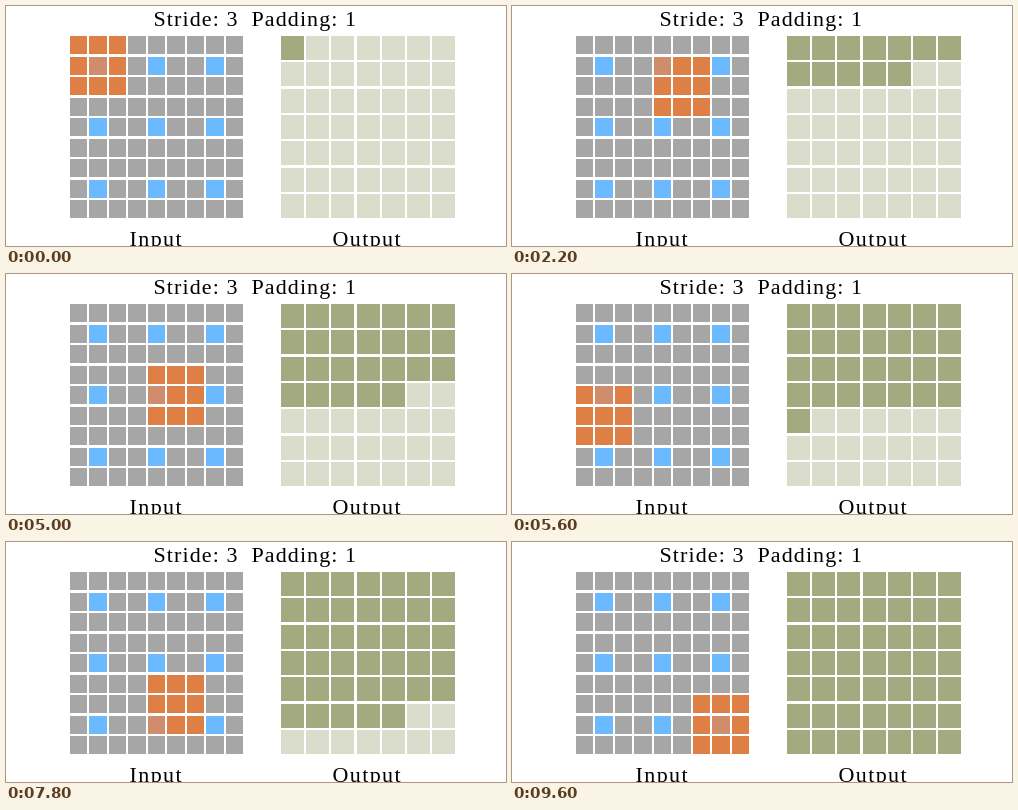
These frames come from a looping animation (500x240 px, 9.8 s). An HTML page:

```html
<!DOCTYPE html>
<html lang="en">
<head>
<meta charset="utf-8">
<title>Convolution arithmetic</title>
<style>
  html, body { margin: 0; width: 500px; height: 240px; overflow: hidden; background: #fff; }
  svg { display: block; shape-rendering: crispEdges; }
  text { font: 22px "Liberation Serif", "Times New Roman", serif; letter-spacing: 1.1px; }
  .caption { letter-spacing: 1.4px; }
</style>
</head>
<body>
<svg width="500" height="240" viewBox="0 0 500 240">
  <g id="input"></g>
  <g id="output"></g>
  <text x="147.5" y="20">Stride: 3</text>
  <text x="245.5" y="20">Padding: 1</text>
  <text class="caption" x="123.5" y="240">Input</text>
  <text class="caption" x="326.5" y="240">Output</text>
</svg>
<script>
const STEP = 200, IN = 9, OUT = 7, KERNEL = 3;
const color = {
  pad: '#a6a6a6', value: '#6bbaff',
  kernel: '#de8046', kernelValue: '#cf8d6b',
  todo: '#dadccc', done: '#a3aa80'
};

function makeGrid(id, size, box) {
  const group = document.getElementById(id);
  return Array.from({ length: size * size }, (_, i) => {
    const col = i % size, row = Math.floor(i / size);
    const rect = document.createElementNS('http://www.w3.org/2000/svg', 'rect');
    const { x, y, w, h } = box(col, row);
    rect.setAttribute('x', x);
    rect.setAttribute('y', y);
    rect.setAttribute('width', w);
    rect.setAttribute('height', h);
    group.append(rect);
    return { rect, col, row };
  });
}

const inputCells = makeGrid('input', IN, (c, r) => ({
  x: Math.floor(64 + 19.5 * c), y: Math.round(30 + 20.5 * r), w: 17 + c % 2, h: 18
}));
const outputCells = makeGrid('output', OUT, (c, r) => ({
  x: Math.round(275 + 25.17 * c), y: Math.round(30 + 26.33 * r), w: 23, h: 24
}));

const covers = (start, pos) => pos >= start && pos < start + KERNEL;
let shown = -1;

function draw(step) {
  const kc = step % OUT, kr = Math.floor(step / OUT);
  for (const { rect, col, row } of inputCells) {
    const value = col % 3 === 1 && row % 3 === 1;
    const hit = covers(kc, col) && covers(kr, row);
    rect.setAttribute('fill', hit
      ? (value ? color.kernelValue : color.kernel)
      : (value ? color.value : color.pad));
  }
  outputCells.forEach(({ rect }, i) =>
    rect.setAttribute('fill', i <= step ? color.done : color.todo));
}

const start = performance.now();
function tick() {
  const elapsed = performance.now() - start;
  const step = Math.floor(elapsed / STEP) % (OUT * OUT);
  if (step !== shown) draw(shown = step);
  requestAnimationFrame(tick);
}
tick();
</script>
</body>
</html>
```
